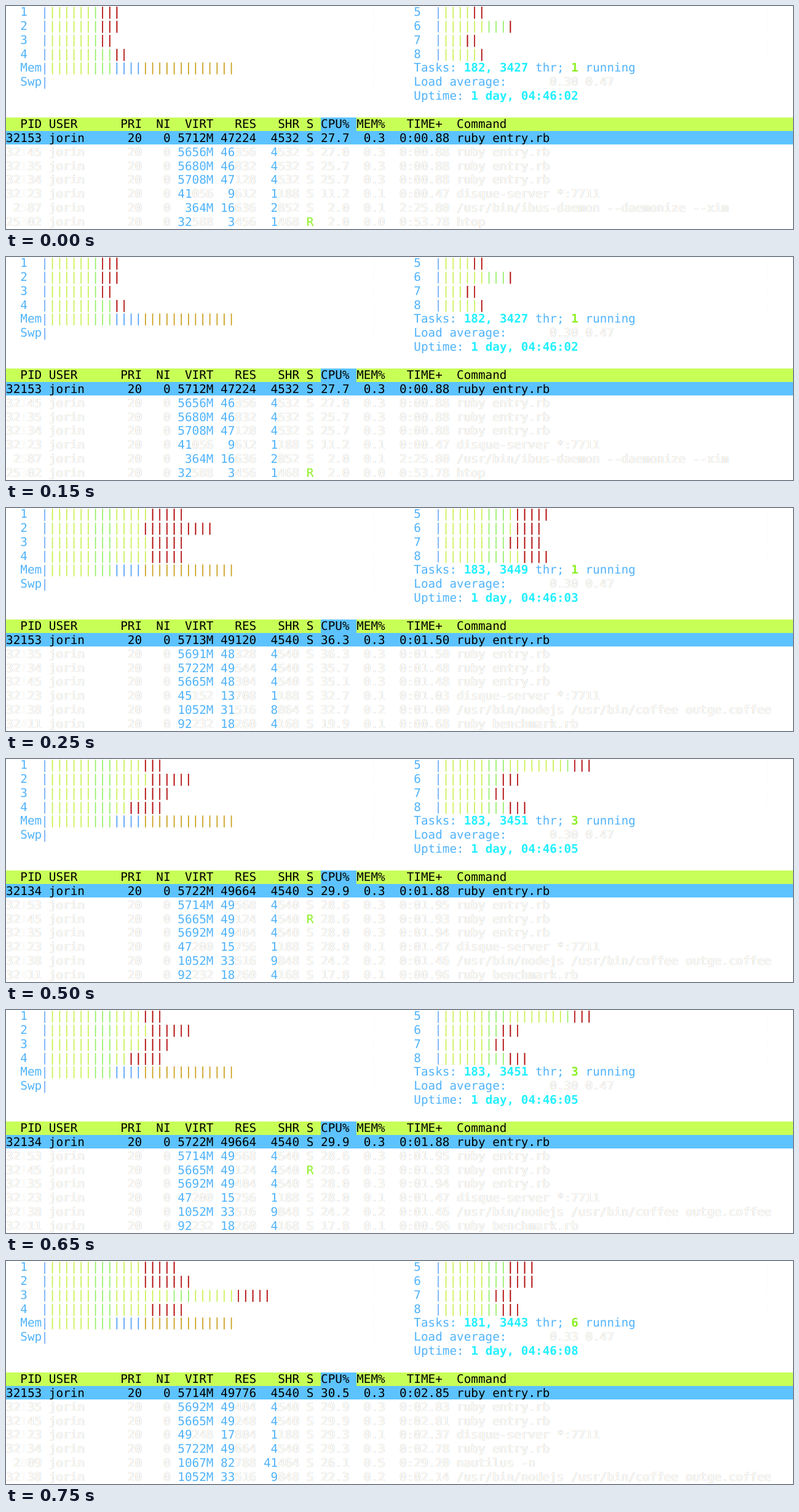
Animation of 1280 by 364 pixels, one loop 1000 ms. Source, as an HTML page:

```html
<!DOCTYPE html>
<html lang="en">
<head>
<meta charset="utf-8">
<title>Process monitor</title>
<style>
html, body { margin: 0; width: 100%; height: 100%; overflow: hidden; background: #fff; }
#stage {
  position: relative; width: 1280px; height: 364px; overflow: hidden;
  font: 19.328px/22.87px "DejaVu Sans Mono", monospace;
  text-rendering: geometricPrecision; font-kerning: none; font-variant-ligatures: none;
}
.layer { position: absolute; inset: 0; }
.frame { visibility: hidden; animation: show 1s step-end infinite; }
@keyframes show { 0% { visibility: visible; } 25%, 100% { visibility: hidden; } }
span, i { position: absolute; white-space: pre; }
.ink { color: #000; }
.label, .used { color: #50b3fb; }
.value { color: #22f0ff; font-weight: bold; }
.live { color: #8cf024; }
.count { color: #8cf024; font-weight: bold; }
.ghost { color: #fff; text-shadow: -.5px 0 #e4c49c, .5px 0 #aed0e8; }
.trace { opacity: .35; }
.lime { color: #c9f04c; }
.green { color: #93ee62; }
.red { color: #b41010; -webkit-text-stroke: .25px #b41010; }
.blue { color: #4a9dfa; }
.gold { color: #c99a10; }
.open { width: 2px; height: 19px; background: #86b9f6; }
.close { width: 1px; height: 19px; background: #fbfbfb; }
.head { left: 0; top: 182px; width: 1280px; height: 22px; background: #c8ff57; }
.sort { left: 512px; top: 182px; width: 58px; height: 22px; background: #5cc3ff; }
.pick { left: 0; top: 204px; width: 1280px; height: 22px; background: #5cc3ff; }
</style>
</head>
<body>
<div id="stage"></div>
<script>
const CELL = 1280 / 110, ROW = 22.87, TOP = -1;
const USER = "jorin";
const RUBY = "ruby entry.rb";
const DISQUE = "disque-server *:7711";
const NODE = "/usr/bin/nodejs /usr/bin/coffee outge.coffee";
const BENCH = "ruby benchmark.rb";

// meters: "normal,kernel" bar counts for cores 1 to 8
// rows: pid virt res shr state cpu mem time, then the command
const states = [
  {
    meters: "7,3 7,3 7,2 9,2 4,2 9,1 3,2 5,1",
    tasks: "182, 3427", running: "1", load: "0.30 0.47", seconds: "02",
    rows: [
      ["32153 5712M 47224 4532 S 27.7 0.3 0:00.88", RUBY],
      ["32145 5656M 46356 4532 S 27.0 0.3 0:00.88", RUBY],
      ["32135 5680M 46832 4532 S 25.7 0.3 0:00.88", RUBY],
      ["32134 5708M 47128 4532 S 25.7 0.3 0:00.88", RUBY],
      ["32123 41056 9612 1188 S 11.2 0.1 0:00.47", DISQUE],
      ["2587 364M 16636 2852 S 2.0 0.1 2:25.80", "/usr/bin/ibus-daemon --daemonize --xim"],
      ["25302 32588 3456 1468 R 2.0 0.0 0:53.78", "htop"]
    ]
  },
  {
    meters: "14,5 13,10 14,5 14,5 10,5 10,4 9,5 11,4",
    tasks: "183, 3449", running: "1", load: "0.30 0.47", seconds: "03",
    rows: [
      ["32153 5713M 49120 4540 S 36.3 0.3 0:01.50", RUBY],
      ["32135 5691M 48328 4540 S 36.3 0.3 0:01.50", RUBY],
      ["32134 5722M 49544 4540 S 35.7 0.3 0:01.48", RUBY],
      ["32145 5665M 48304 4540 S 35.1 0.3 0:01.48", RUBY],
      ["32123 45152 13708 1188 S 32.7 0.1 0:01.03", DISQUE],
      ["32138 1052M 31516 8864 S 32.7 0.2 0:01.00", NODE],
      ["32411 92232 18260 4168 S 19.9 0.1 0:00.68", BENCH]
    ]
  },
  {
    meters: "13,3 14,6 13,4 11,5 18,3 8,3 7,2 9,3",
    tasks: "183, 3451", running: "3", load: "0.30 0.47", seconds: "05",
    rows: [
      ["32134 5722M 49664 4540 S 29.9 0.3 0:01.88", RUBY],
      ["32153 5714M 49568 4540 S 28.6 0.3 0:01.95", RUBY],
      ["32145 5665M 49124 4540 R 28.6 0.3 0:01.93", RUBY],
      ["32135 5692M 49404 4540 S 28.0 0.3 0:01.94", RUBY],
      ["32123 47200 15756 1188 S 28.0 0.1 0:01.47", DISQUE],
      ["32138 1052M 33516 9848 S 24.2 0.2 0:01.46", NODE],
      ["32411 92232 18260 4168 S 17.8 0.1 0:00.96", BENCH]
    ]
  },
  {
    meters: "13,5 13,7 26,5 14,5 9,4 9,4 7,3 8,3",
    tasks: "181, 3443", running: "6", load: "0.33 0.47", seconds: "08",
    rows: [
      ["32153 5714M 49776 4540 S 30.5 0.3 0:02.85", RUBY],
      ["32135 5692M 49404 4540 S 29.9 0.3 0:02.83", RUBY],
      ["32145 5665M 49248 4540 S 29.9 0.3 0:02.81", RUBY],
      ["32123 49248 17804 1188 S 29.3 0.1 0:02.37", DISQUE],
      ["32134 5722M 49664 4540 S 29.3 0.3 0:02.78", RUBY],
      ["2809 1067M 82788 41464 S 26.1 0.5 0:29.20", "nautilus -n"],
      ["32138 1052M 33516 9848 S 22.3 0.2 0:02.14", NODE]
    ]
  }
];

const stage = document.getElementById("stage");

function add(parent, tag, cls, x, y) {
  const el = document.createElement(tag);
  el.className = cls;
  if (x !== undefined) {
    el.style.left = x + "px";
    el.style.top = y + "px";
  }
  return parent.appendChild(el);
}

// Places each word on the character grid.
function put(layer, col, row, text, cls) {
  for (const m of text.matchAll(/\S+/g)) {
    const el = add(layer, "span", cls, (col + m.index) * CELL, row * ROW + TOP);
    el.textContent = m[0];
  }
}

function bars(layer, col, row, from, count, cls) {
  for (let i = from; i < from + count; i++) {
    const tone = cls || (i % 11 > 5 && i % 11 < 9 ? "green" : "lime");
    put(layer, col + i, row, "|", tone);
  }
}

// Thousands stay bright, the last three digits fade.
function memory(layer, end, row, text) {
  const start = end - text.length;
  const cut = text.endsWith("M") ? text.length : text.length - 3;
  put(layer, start, row, text.slice(0, cut), "used");
  put(layer, start + cut, row, text.slice(cut), "ghost");
}

function process(layer, row, [stats, command], picked) {
  const [pid, virt, res, shr, state, cpu, mem, time] = stats.split(" ");
  const cls = picked ? "ink" : "ghost";
  const right = (end, text) => put(layer, end - text.length, row, text, cls);
  if (picked) {
    right(5, pid);
    right(29, virt);
    right(35, res);
    right(41, shr);
  } else {
    const full = pid.padStart(5);
    put(layer, 0, row, full.slice(0, 2), cls);
    put(layer, 2, row, full[2], cls + " trace");
    put(layer, 3, row, full.slice(3), cls);
    memory(layer, 29, row, virt);
    memory(layer, 35, row, res);
    memory(layer, 41, row, shr);
  }
  put(layer, 6, row, USER, cls);
  put(layer, 17, row, "20", cls);
  put(layer, 22, row, "0", cls);
  put(layer, 42, row, state, state === "R" ? "live" : cls);
  right(48, cpu);
  right(53, mem);
  right(62, time);
  put(layer, 63, row, command, cls);
}

function drawBase() {
  const base = add(stage, "div", "layer");
  ["head", "sort", "pick"].forEach(cls => add(base, "i", cls));
  ["1", "2", "3", "4", "Mem", "Swp"].forEach((name, row) => {
    const y = row * ROW + 1.5;
    put(base, 2, row, name, "label");
    add(base, "i", "open", 62, y);
    add(base, "i", "close", 598, y);
    if (row > 3) return;
    put(base, 57, row, String(row + 5), "label");
    add(base, "i", "open", 702, y);
    add(base, "i", "close", 1238, y);
  });
  bars(base, 6, 4, 0, 9);
  bars(base, 6, 4, 9, 4, "blue");
  bars(base, 6, 4, 13, 13, "gold");
  put(base, 57, 4, "Tasks:", "label");
  put(base, 74, 4, "thr;", "label");
  put(base, 81, 4, "running", "label");
  put(base, 57, 5, "Load average:", "label");
  put(base, 57, 6, "Uptime:", "label");
  put(base, 0, 8, "  PID USER      PRI  NI  VIRT   RES   SHR S CPU% MEM%   TIME+  Command", "ink");
}

function drawState(state, index) {
  const layer = add(stage, "div", "layer frame");
  layer.style.animationDelay = index * 250 - 1000 + "ms";
  state.meters.split(" ").forEach((pair, core) => {
    const [normal, kernel] = pair.split(",").map(Number);
    const col = core < 4 ? 6 : 61;
    bars(layer, col, core % 4, 0, normal);
    bars(layer, col, core % 4, normal, kernel, "red");
  });
  put(layer, 64, 4, state.tasks, "value");
  put(layer, 79, 4, state.running, "count");
  put(layer, 76, 5, state.load, "ghost");
  put(layer, 65, 6, "1 day, 04:46:" + state.seconds, "value");
  state.rows.forEach((row, i) => process(layer, 9 + i, row, i === 0));
}

drawBase();
states.forEach(drawState);
</script>
</body>
</html>
```
